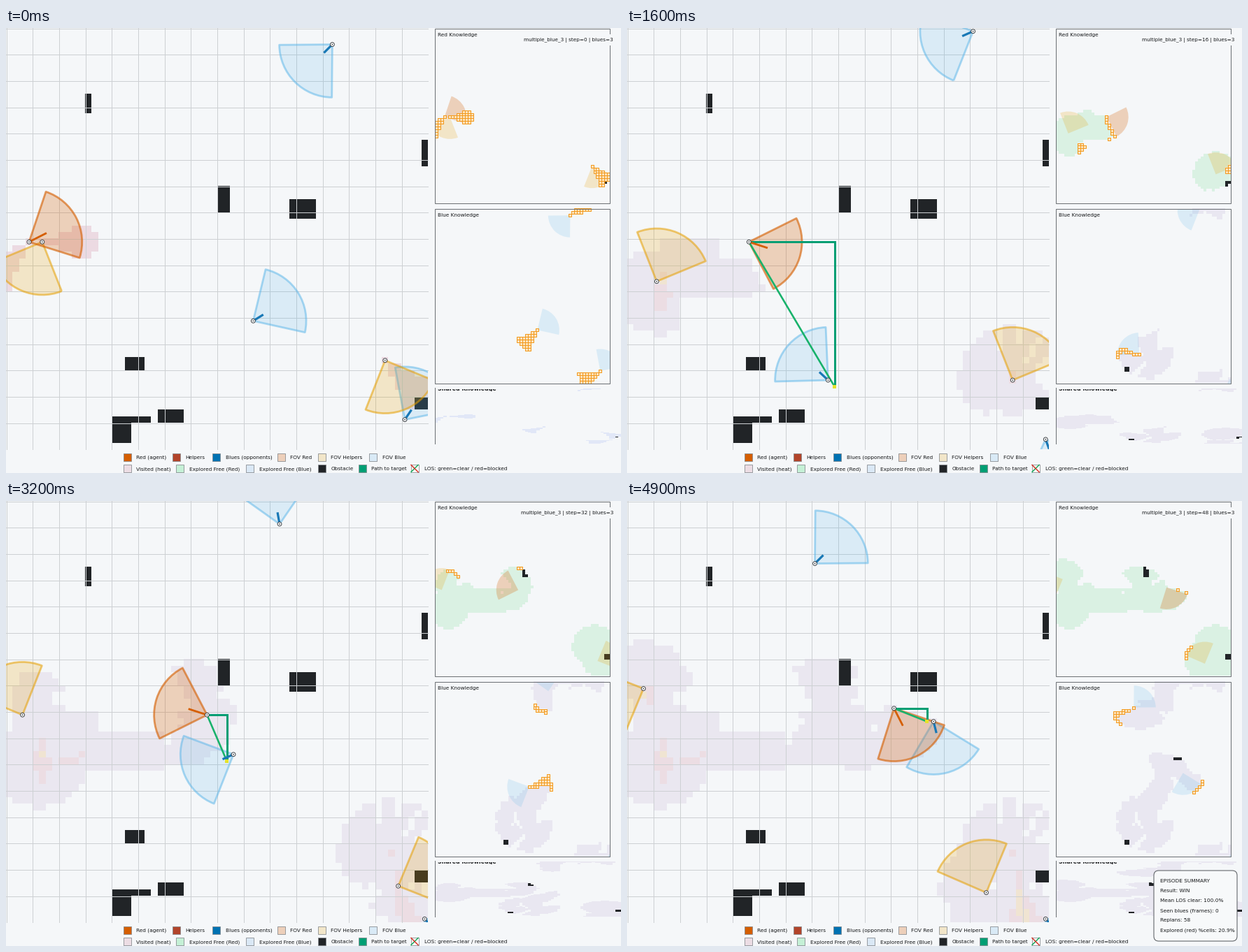
A matplotlib script for the animation above (5000 ms loop, 879 by 637 pixels).

```python
import numpy as np
import matplotlib.pyplot as plt
from matplotlib.animation import FuncAnimation
from matplotlib.colors import to_rgba
from matplotlib.patches import Circle, FancyBboxPatch, Rectangle, Wedge

W, H, DPI = 879, 637, 64
PX = 72 / DPI                      # points per pixel
N, SIDE, REACH = 64, 603, 8        # cells per side, arena pixels, view range
CELL = SIDE / N
LAST = 48
BG, DARK, TEXT = "#f5f7f9", "#212427", "#16181a"
RED, HELPER, BLUE = "#d55e00", "#e69f00", "#56b4e9"
PATH, FRONTIER = "#009e73", "#f39a1e"

# Waypoints: step, column, row, shown heading, sensor heading
RED_AGENT = [(0, 3, 32, -27, 135), (4, 6, 32, 18, 90), (12, 14, 32, 18, 87),
             (20, 22, 32, 18, 87), (24, 26, 32, 63, 45), (26, 26, 32, 108, 0),
             (28, 27, 32, 153, -60), (31, 29, 32, 198, -110),
             (34, 31, 32, -117, -60), (37, 33, 32, -72, 100),
             (42, 37, 32, -27, 60), (48, 40, 31, 63, 35)]
HELPER_A = [(0, 5, 32, 113, 0), (4, 5, 34, 23, 90), (8, 5, 38, -22, 90),
            (12, 5, 38, -67, 160), (16, 4, 38, -67, 60), (20, 3, 37, -112, 0),
            (26, 2, 37, -158, -90), (34, 2, 30, -112, -45),
            (37, 2, 29, -112, -160), (42, 2, 29, -157, -45), (48, 2, 28, 157, 180)]
HELPER_B = [(0, 57, 50, 67, 45), (4, 58, 50, 22, 100), (8, 58, 53, -67, 180),
            (12, 58, 53, -112, -135), (16, 58, 53, -67, -30), (20, 59, 54, -22, 110),
            (26, 59, 57, 22, 60), (37, 59, 59, -22, 90), (43, 57, 59, -67, 135),
            (46, 55, 59, -112, 180), (48, 54, 59, -112, -145)]
BLUE_1 = [(0, 49, 2, 135, -35), (4, 50, 0, 144, -45), (12, 53, 0, 111, 5),
          (20, 51, 0, -132, -90), (26, 45, 0, -136, -145), (31, 42, 2, -100, 110),
          (37, 38, 6, -45, 150), (42, 33, 8, -45, 60), (48, 28, 9, -45, 145)]
BLUE_2 = [(0, 37, 44, -32, 135), (3, 35, 47, 17, 100), (4, 35, 48, 17, 90),
          (8, 34, 52, -28, 10), (11, 34, 54, -47, 100), (12, 33, 55, -47, 160),
          (16, 30, 53, -137, 180), (19, 27, 50, 171, -70), (20, 27, 49, 171, -50),
          (25, 29, 44, 111, -15), (26, 30, 44, 111, 0), (31, 33, 39, 156, 10),
          (36, 36, 35, -156, -80), (37, 36, 34, -156, -90),
          (42, 41, 33, 120, 20), (48, 46, 33, 76, 40)]
BLUE_3 = [(0, 60, 59, -56, 155), (4, 59, 63, 30, 150), (12, 63, 63, 70, 45),
          (20, 63, 60, 73, 0), (26, 63, 63, 45, 45), (37, 63, 63, 70, 45),
          (48, 63, 63, 45, 45)]
REDS = [RED_AGENT, HELPER_A, HELPER_B]
BLUES = [BLUE_1, BLUE_2, BLUE_3]

# Obstacles: column, row, width, height in cells
BLOCKS = [(12, 10, 1, 3), (63, 17, 1, 4), (32, 24, 2, 4), (43, 26, 4, 3),
          (18, 50, 3, 2), (23, 58, 4, 2), (16, 59, 6, 1), (16, 60, 3, 3),
          (62, 56, 2, 2)]
solid = np.zeros((N, N), bool)
for bx, by, bw, bh in BLOCKS:
    solid[by:by + bh, bx:bx + bw] = True


def turn(a, b):
    return (b - a + 180) % 360 - 180


def pose(track, step):
    """Column, row, shown heading and sensor heading at a step."""
    for a, b in zip(track, track[1:]):
        if step <= b[0]:
            t = (step - a[0]) / (b[0] - a[0])
            col, row = (int(a[i] + (b[i] - a[i]) * t + 0.5) for i in (1, 2))
            spin = turn(a[3], b[3])
            shown = b[3] if t == 1 else a[3] + 45 * round(spin * t / 45)
            return col, row, shown, a[4] + turn(a[4], b[4]) * t
    return track[-1][1:]


rows, cols = np.mgrid[:N, :N]


def sensed(track, step):
    col, row, _, heading = pose(track, step)
    dx, dy = cols - col, rows - row
    off = np.abs(turn(heading, np.degrees(np.arctan2(dy, dx))))
    return (np.hypot(dx, dy) <= REACH + 0.2) & ((off <= 23) | (dx ** 2 + dy ** 2 == 0))


def visit_counts(team):
    per_step = [sum(sensed(track, s).astype(int) for track in team)
                for s in range(LAST + 1)]
    return np.cumsum(per_step, axis=0)


red_counts, blue_counts = visit_counts(REDS), visit_counts(BLUES)


def paint(*layers):
    """RGBA cell image from (mask, colour) layers."""
    img = np.zeros((N, N, 4))
    for mask, color in layers:
        img[mask] = to_rgba(color)
    return img


fig = plt.figure(figsize=(W / DPI, H / DPI), dpi=DPI, facecolor=BG)
ax = fig.add_axes([0, 0, 1, 1])
live = []


def region(x, y, w, h):
    return Rectangle((x, y), w, h, transform=ax.transData)


arena = region(0, 0, SIDE, SIDE)


def keep(artist, clip=None):
    if clip is not None:
        artist.set_clip_path(clip)
    live.append(artist)
    return artist


def label(x, y, s, size=7.4, **kw):
    return ax.text(x, y + 2.7, s, fontsize=size * PX, family="DejaVu Sans",
                   color=TEXT, va="baseline", **kw)


def box(x, y, w, h, **kw):
    return ax.add_patch(Rectangle((x, y), w, h, **kw))


def cell_image(img, x, y, w, h):
    keep(ax.imshow(img, extent=(x, x + w, y + h, y), aspect="auto",
                   interpolation="nearest", zorder=1))


def fov(track, step, color, alpha, x0=0, y0=0, cell=CELL, clip=arena, edge=0):
    col, row, heading, _ = pose(track, step)
    shape = dict(center=(x0 + (col + 0.5) * cell, y0 + (row + 0.5) * cell),
                 r=REACH * cell * 1.005, theta1=heading - 44.5,
                 theta2=heading + 44.5, zorder=4)
    keep(ax.add_patch(Wedge(**shape, fc=color, ec="none", alpha=alpha)), clip)
    if edge:
        keep(ax.add_patch(Wedge(**shape, fc="none", ec=color, alpha=edge,
                                lw=2.8 * PX, joinstyle="round")), clip)


def line(xs, ys, color, width, z):
    keep(ax.plot(xs, ys, color=color, lw=width * PX, zorder=z,
                 solid_capstyle="butt", solid_joinstyle="miter")[0], arena)


def marker(track, step, color=None, length=0, width=3):
    col, row, heading, _ = pose(track, step)
    x, y, a = (col + 0.5) * CELL, (row + 0.5) * CELL, np.radians(heading)
    if color:
        line([x, x + length * np.cos(a)], [y, y + length * np.sin(a)], color, width, 6)
    keep(ax.add_patch(Circle((x, y), 2.9, fc="white", ec="#44484c", lw=PX,
                             zorder=7)), arena)
    keep(ax.add_patch(Circle((x, y), 0.9, fc="#44484c", ec="none", zorder=7)), arena)


def draw_arena(step):
    counts = red_counts[step]
    level = counts / counts.max()
    seen = (counts >= (1 if step < 5 else 2)) & ~solid
    if step == 0:
        layers = [(seen, "#ecdae2")]
    else:
        layers = [(seen, "#eae7f0"), (seen & (level > 0.55), "#ecdde3"),
                  (seen & (level > 0.9), "#f0e4d2")]
    cell_image(paint(*layers), 0, 0, SIDE, SIDE)

    for track in BLUES:
        fov(track, step, BLUE, 0.17, edge=0.5)
    for track in REDS[1:]:
        fov(track, step, HELPER, 0.2, edge=0.55)
    fov(RED_AGENT, step, RED, 0.25, edge=0.62)

    if step:
        x0, y0 = ((v + 0.5) * CELL for v in pose(RED_AGENT, step)[:2])
        x1, y1 = ((v + 0.5) * CELL for v in pose(BLUE_2, step - 1)[:2])
        line([x0, x1, x1], [y0, y0, y1], PATH, 3, 5)
        line([x0, x1], [y0, y1], "#18b26b", 2.6, 5)
        keep(box(x1 - 2.5, y1 - 2.5, 5, 5, fc="#e4e32b", ec="none", zorder=5))

    for track in BLUES:
        marker(track, step, "#1878b6", 17, 3.2)
    for track in REDS[1:]:
        marker(track, step)
    marker(RED_AGENT, step, RED, 28, 2.8)


def draw_panel(step, y0, counts, free, views):
    x0, size = 613, 250
    cell = size / N
    frame = region(x0, y0, size, size)
    known = counts[step] > 0
    fresh = known & ~solid
    if step:
        fresh &= counts[step - 1] == 0
    cell_image(paint((known & ~fresh, free), (known & solid, DARK)), x0, y0, size, size)
    for track, color, alpha in views:
        fov(track, step, color, alpha, x0, y0, cell, frame)
    r, c = np.nonzero(fresh)
    keep(ax.scatter(x0 + (c + 0.5) * cell, y0 + (r + 0.5) * cell, marker="s",
                    s=(3.1 * PX) ** 2, facecolors="#fbe3bd", edgecolors=FRONTIER,
                    linewidths=PX, zorder=5))


def draw_shared(step):
    known = (red_counts[step] > 0) | (blue_counts[step] > 0)
    free = "#e1e7f7" if step == 0 else "#e9e7f1"
    cell_image(paint((known, free), (known & solid, DARK)), 613, 516.5, 265.5, 78.5)


def draw_summary():
    keep(ax.add_patch(FancyBboxPatch((760, 536), 105, 87, zorder=10, fc="#f7f9fa",
                                     ec="#55595d", lw=PX,
                                     boxstyle="round,pad=7,rounding_size=7")))
    lines = ["EPISODE SUMMARY", "Result: WIN", "Mean LOS clear: 100.0%",
             "Seen blues (frames): 0", "Replans: 58", "Explored (red) %cells: 20.9%"]
    for i, s in enumerate(lines):
        keep(label(762, 543 + 14.1 * i, s, zorder=11))


def draw_static():
    for bx, by, bw, bh in BLOCKS:
        box(bx * CELL, by * CELL, bw * CELL, bh * CELL, fc=DARK, ec="none", zorder=2)
    for k in range(0, N, 4):
        p = int(k * CELL) + 0.5
        ax.plot([p, p], [0, SIDE], color="#cdd0d3", lw=PX, zorder=3)
        ax.plot([0, SIDE], [p, p], color="#cdd0d3", lw=PX, zorder=3)
    for y, name in [(0.5, "Red Knowledge"), (258.5, "Blue Knowledge")]:
        box(612.5, y, 250, 250, fc="none", ec="#6c7074", lw=PX, zorder=7)
        label(617, y + 8.5, name, zorder=7)
    for x in (612.5, 878.5):
        ax.plot([x, x], [515, 595], color="#6c7074", lw=PX, zorder=7)
    shared = label(617, 516.5, "Shared Knowledge", 7.9, weight="bold", zorder=7,
                   clip_on=True)
    shared.set_clip_path(region(613, 516.5, 265, 3.5))
    box(736, 9, 137, 16, fc=BG, ec="none", zorder=8)

    legend = [
        (614, [(167, RED, "Red (agent)"), (237, "#b2442a", "Helpers"),
               (294, "#0072b2", "Blues (opponents)"), (387, "#edcfba", "FOV Red"),
               (445, "#f2e6c9", "FOV Helpers"), (518, "#d9eaf6", "FOV Blue")]),
        (630.5, [(167, "#ecdde4", "Visited (heat)"), (242, "#c5f0d6", "Explored Free (Red)"),
                 (342, "#dae8f5", "Explored Free (Blue)"), (445, DARK, "Obstacle"),
                 (503, PATH, "Path to target"),
                 (578, "white", "LOS: green=clear / red=blocked")])]
    for y, entries in legend:
        for x, color, name in entries:
            box(x + 0.5, y - 5.5, 11, 11, fc=color, ec="#85898d", lw=0.8 * PX, zorder=8)
            label(x + 19.5, y, name, zorder=8)
    ax.plot([579, 589], [635.5, 625.5], color="#18a85c", lw=1.5 * PX, zorder=9)
    ax.plot([579, 589], [625.5, 635.5], color="#d9362b", lw=1.5 * PX, zorder=9)


def update(frame):
    while live:
        live.pop().remove()
    step = min(frame, LAST)
    draw_arena(step)
    draw_panel(step, 0.5, red_counts, "#daf1e3",
               [(RED_AGENT, RED, 0.25), (HELPER_A, HELPER, 0.2), (HELPER_B, HELPER, 0.2)])
    draw_panel(step, 258.5, blue_counts, "#e9e7f1",
               [(track, BLUE, 0.17) for track in BLUES])
    draw_shared(step)
    keep(label(868, 16, f"multiple_blue_3 | step={step} | blues=3", 7.2,
               ha="right", zorder=9))
    if frame > LAST:
        draw_summary()
    ax.set(xlim=(0, W), ylim=(H, 0))
    ax.axis("off")
    return live


draw_static()
anim = FuncAnimation(fig, update, frames=LAST + 2, init_func=lambda: update(0),
                     interval=100, repeat=True, repeat_delay=0, blit=False)
plt.show()
```
